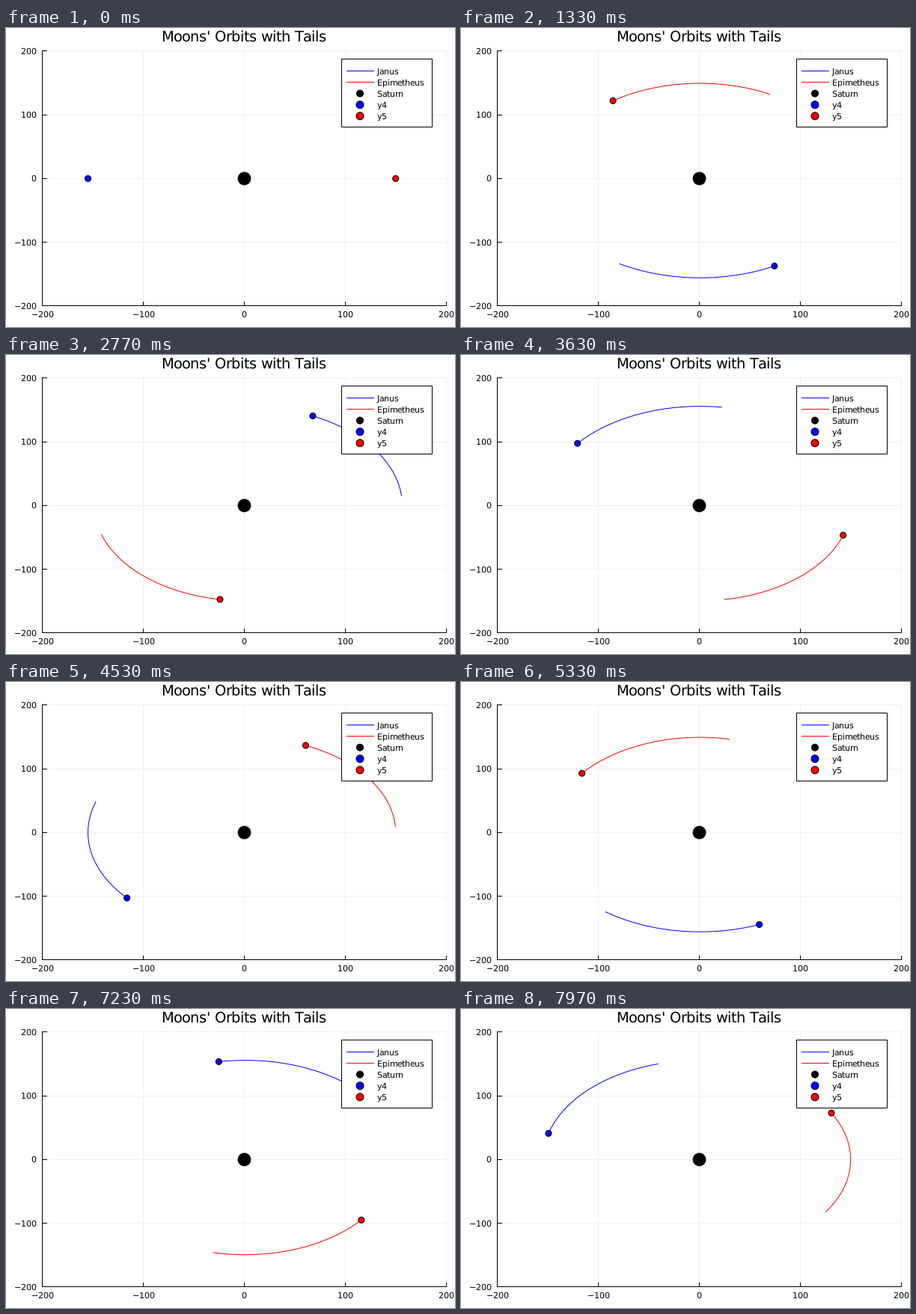
A matplotlib script that plays this animation: 600 px wide and 400 px high, repeating every 8000 ms.

```python
import numpy as np
import matplotlib.pyplot as plt
from matplotlib.animation import FuncAnimation
from matplotlib.patches import Circle, PathPatch, Rectangle
from matplotlib.path import Path
from matplotlib.textpath import TextPath, text_to_path

W, H, DPI = 600, 400, 100
LOOP, TICK = 8000, 20  # ms
STEP = 1000 / 30       # ms per simulation step
TAIL = 20
LEFT, RIGHT, TOP, BOTTOM = 48.9, 588.1, 30.9, 371.9
PT = 72 / DPI          # points per pixel
SMALL, LARGE = 8 / PT, 14 / PT

plt.rcParams["font.family"] = "DejaVu Sans"

fig = plt.figure(figsize=(W / DPI, H / DPI), dpi=DPI, facecolor="white")
ax = fig.add_axes([0, 0, 1, 1])
ax.set_xlim(0, W)
ax.set_ylim(H, 0)
ax.axis("off")
font = ax.title.get_fontproperties()


def px(x):
    return LEFT + (x + 200) / 400 * (RIGHT - LEFT)


def py(y):
    return BOTTOM - (y + 200) / 400 * (BOTTOM - TOP)


def line(xs, ys, color="black", z=2):
    return ax.plot(xs, ys, color=color, lw=PT, zorder=z)[0]


def rule(x0, y0, x1, y1, color="black", z=2):
    """Straight line, sharp on the pixel row or column it falls in."""
    line([x0 - 0.5, x1 - 0.5], [y0 - 0.5, y1 - 0.5], color, z)


def dot(x, y, color, radius, z=4):
    return ax.add_patch(Circle((x, y), radius, fc=color, ec="black",
                               lw=PT, zorder=z))


def advance(char, size):
    """Advance in whole pixels, rounded down."""
    width = text_to_path.get_text_width_height_descent(char, font, False)[0]
    return int(width / font.get_size_in_points() * size)


def label(x, y, text, size=SMALL, align=0.0):
    """Text on a baseline; align is 0 for left, 0.5 centre, 1 right."""
    steps = [advance(c, size) for c in text]
    x, y = round(x - align * sum(steps)), round(y)
    glyphs = []
    for char, step in zip(text, steps):
        if char != " ":
            glyph = TextPath((0, 0), char, size=size)
            glyphs.append(Path(glyph.vertices * [1, -1] + [x, y],
                               glyph.codes))
        x += step
    ax.add_patch(PathPatch(Path.make_compound_path(*glyphs), fc="black",
                           lw=0, zorder=7))


class Moon:
    """Slightly eccentric orbit, moving counter-clockwise."""

    def __init__(self, color, a, ecc, rate, start, peri):
        self.a, self.ecc, self.rate = a, ecc, np.radians(rate)
        self.start, self.peri = start, peri
        self.tail = line([], [], color, z=3)
        self.body = dot(0, 0, color, 4)

    def at(self, t):
        mean = self.start - self.peri + self.rate * t
        true = mean + 2 * self.ecc * np.sin(mean)
        r = self.a * (1 - self.ecc ** 2) / (1 + self.ecc * np.cos(true))
        angle = true + self.peri
        return px(r * np.cos(angle)), py(r * np.sin(angle))

    def move(self, i):
        x, y = self.at(np.arange(max(0, i - TAIL), i + 1))
        self.tail.set_data(x, y)
        self.body.center = x[-1], y[-1]


# Grid, axes and tick labels
for v in range(-200, 201, 100):
    x, y = px(v), py(v)
    name = str(v).replace("-", "\u2212")
    rule(x, TOP, x, BOTTOM, "#f0f0f0", z=1)
    rule(LEFT, y, RIGHT, y, "#f0f0f0", z=1)
    rule(x, BOTTOM, x, BOTTOM - 5.5)
    rule(LEFT, y, LEFT + 5.5, y)
    label(x, 387, name, align=0.5)
    label(41, y + 4, name, align=1)
rule(LEFT, TOP, LEFT, BOTTOM)
rule(LEFT, BOTTOM, RIGHT, BOTTOM)
label(px(0), 18, "Moons' Orbits with Tails", LARGE, 0.5)

# Planet and moons
dot(px(0), py(0), "black", 8.4)
moons = [Moon("blue", 155.8, 0.005, 2.949, np.pi, np.pi),
         Moon("red", 149.4, 0.004, 3.1355, 0, np.pi)]

# Legend
ax.add_patch(Rectangle((448, 41), 121, 91, fc="white", ec="black",
                       lw=PT, zorder=5))
names = ["Janus", "Epimetheus", "Saturn", "y4", "y5"]
colors = ["blue", "red", "black", "blue", "red"]
for k, (name, color) in enumerate(zip(names, colors)):
    y = 57.4 + 15.1 * k
    if k < 2:
        rule(455, y, 491, y, color, z=6)
    else:
        dot(473, y, color, 4.5 if k == 2 else 5, z=6)
    label(496.5, y + 4.2, name)


def update(i):
    for moon in moons:
        moon.move(round(i * TICK / STEP))
    return [part for m in moons for part in (m.tail, m.body)]


anim = FuncAnimation(fig, update, frames=LOOP // TICK, interval=TICK,
                     init_func=lambda: update(0), repeat=True,
                     repeat_delay=0)
plt.show()
```
